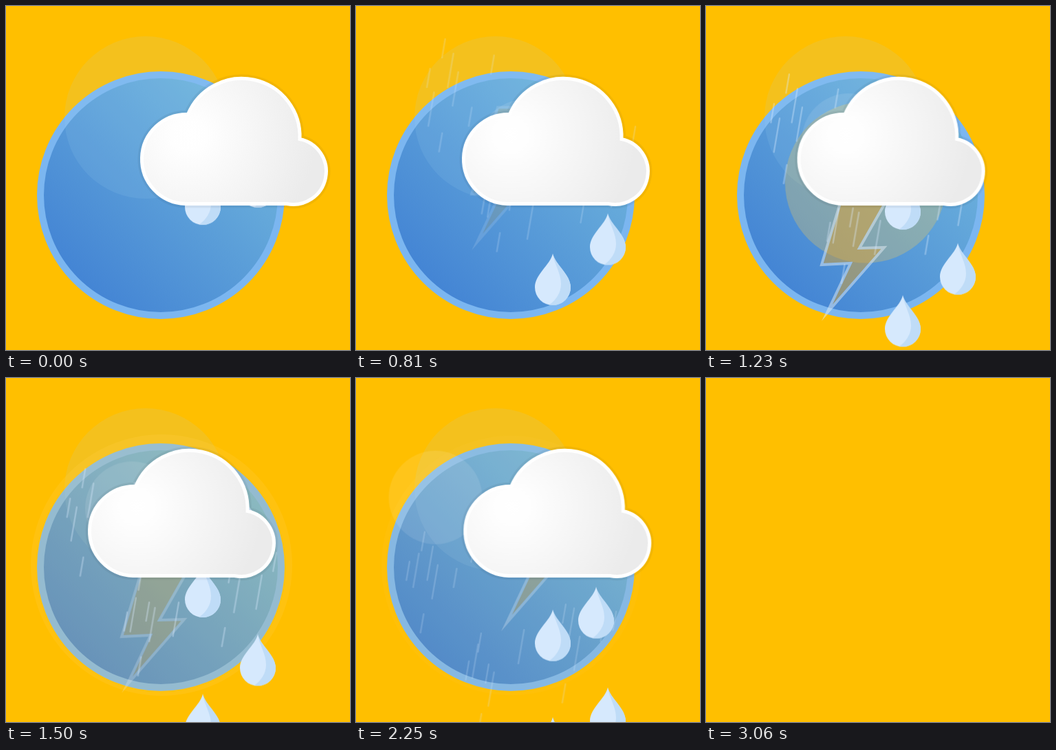
Write an HTML page that moves like this. It is 500 px wide and 500 px high and loops after 3090 ms.

```html
<!DOCTYPE html>
<html lang="en">
<head>
<meta charset="utf-8">
<title>Storm cloud</title>
<style>
  html, body { margin: 0; width: 100%; height: 100%; overflow: hidden; background: #ffbf00; }
  svg { display: block; width: 100vw; height: 100vh; }
  .anim, #rain line { animation: 3.09s linear infinite; }

  #scene { animation-name: blank; }
  #cloud { animation-name: drift; }
  #halo { animation-name: flash; }
  #flare { animation-name: slide; }
  #bolt { animation-name: strike; }
  #rain { animation-name: shower; }
  #rain line { animation-name: fall; }
  #dropA { animation-name: dropA; }
  #dropB { animation-name: dropB; }
  #dropC { animation-name: dropC; }
  #dropD { animation-name: dropD; }

  @keyframes blank {
    0%, 99% { opacity: 1; }
    99.02%, 100% { opacity: 0; }
  }
  @keyframes drift {
    0%, 98.06%, 100% { transform: translateX(0); }
    48.54% { transform: translateX(-76px); }
  }
  @keyframes flash {
    0%, 25.8% { transform: translate(242px, 231px) scale(0); opacity: .4; }
    48.54% { transform: translate(226px, 272px) scale(1); opacity: .2; }
    63.11% { transform: translate(226px, 272px) scale(1); opacity: .04; }
    84.47% { transform: translate(225px, 273px) scale(.985); opacity: .15; }
    100% { transform: translate(225px, 274px) scale(.97); opacity: .05; }
  }
  @keyframes slide {
    from { transform: translate(318px, 221px); }
    to { transform: translate(40px, 156px); }
  }
  @keyframes strike {
    0%, 19% { transform: translate(0, -158px); opacity: 0; }
    26.21% { transform: translate(0, -103px); opacity: .15; }
    39.6% { transform: translate(0, 0); opacity: .5; }
    48.54% { transform: translate(0, 0); opacity: .25; }
    63.11% { transform: translate(26px, -54px); opacity: 1; }
    77%, 100% { transform: translate(50px, -105px); opacity: 0; }
  }
  @keyframes shower {
    0%, 23.5% { opacity: 0; }
    28%, 68% { opacity: 1; }
    80%, 100% { opacity: 0; }
  }
  /* --v is the speed in px per ms; streaks are placed as they stand at 1950 ms */
  @keyframes fall {
    from { transform: translate(calc(var(--v) * 331.5px), calc(var(--v) * -1950px)); }
    to { transform: translate(calc(var(--v) * -193.8px), calc(var(--v) * 1140px)); }
  }
  @keyframes dropA {
    0% { transform: translate(286px, 243px); }
    56.15%, 100% { transform: translate(286px, 493px); }
  }
  @keyframes dropB {
    0%, 20.71% { transform: translate(286px, 200px); }
    100% { transform: translate(286px, 407.7px); }
  }
  @keyframes dropC {
    from { transform: translate(366px, 218px); }
    to { transform: translate(366px, 536px); }
  }
  @keyframes dropD {
    0%, 48.54% { transform: translate(349px, 177px); }
    100% { transform: translate(349px, 445px); }
  }
</style>
</head>
<body>
<svg viewBox="0 0 500 500">
  <defs>
    <linearGradient id="sky" gradientUnits="userSpaceOnUse" x1="100" y1="400" x2="350" y2="150">
      <stop offset="0" stop-color="#4384d4"/>
      <stop offset="1" stop-color="#6fb4dc"/>
    </linearGradient>
    <radialGradient id="puff" gradientUnits="userSpaceOnUse" cx="266" cy="187" r="185">
      <stop offset="0" stop-color="#fff"/>
      <stop offset=".14" stop-color="#fefefe"/>
      <stop offset="1" stop-color="#ebebeb"/>
    </radialGradient>
    <path id="cloudShape" d="M260.500 287.500A65 65 0 0 1 264.500 157.500A84.500 84.500 0 0 1 427 193.500A47.500 47.500 0 0 1 408 287.500Z"/>
    <g id="drop">
      <path fill="#d6e9fd" d="M0 0C4 17 26 30 26 49A26 26 0 0 1-26 49C-26 30-4 17 0 0Z"/>
      <path fill="#bfdcf7" d="M0 0C4 17 26 30 26 49A26 26 0 0 1-5 74.500C5 67 12 57 12 44C12 28 2 15 0 0Z"/>
    </g>
  </defs>
  <g id="scene" class="anim">
    <circle cx="225" cy="275" r="175" fill="url(#sky)" stroke="#7bb6f0" stroke-width="10"/>
    <circle cx="203" cy="162" r="118" fill="#a3d0e9" opacity=".12"/>
    <circle id="halo" class="anim" r="190" fill="#ffd050"/>
    <circle id="flare" class="anim" r="68" fill="#fff" fill-opacity=".1"/>
    <polygon id="bolt" class="anim" points="206,250 168,376 210,374 176,446 259,351 223,352 281,250"
      fill="#dfa22b" stroke="#e6eef5" stroke-width="4" stroke-miterlimit="10"/>
    <g id="rain" class="anim" stroke="#dcebff" stroke-opacity=".36" stroke-width="2.4" stroke-linecap="round"></g>
    <use id="dropA" class="anim" href="#drop"/>
    <use id="dropB" class="anim" href="#drop"/>
    <use id="dropC" class="anim" href="#drop"/>
    <use id="dropD" class="anim" href="#drop"/>
    <g id="cloud" class="anim">
      <use href="#cloudShape" fill="none" stroke="#000" stroke-opacity=".05" stroke-width="12"/>
      <use href="#cloudShape" fill="url(#puff)" stroke="#fff" stroke-width="5"/>
    </g>
  </g>
</svg>
<script>
  // x, y, speed of each streak
  const short = [
    [106, 187, .122], [84, 230, .122], [104, 310, .11], [188, 335, .12],
    [169, 383, .095], [188, 455, .11], [310, 412, .109], [384, 305, .114],
    [311, 293, .12], [199, 380, .12], [151, 250, .09], [178, 205, .117]
  ];
  const long = [
    [118, 208, .122], [125, 235, .122], [96, 228, .09], [182, 360, .09],
    [207, 390, .125], [247, 350, .053], [331, 342, .112], [367, 315, .063],
    [323, 300, .115]
  ];
  const rain = document.getElementById('rain');

  function addStreak([x, y, speed], length) {
    const line = document.createElementNS(rain.namespaceURI, 'line');
    const ends = { x1: x, y1: y, x2: x - length * .17, y2: y + length };
    for (const key in ends) line.setAttribute(key, ends[key]);
    line.style.setProperty('--v', speed);
    rain.append(line);
  }

  short.forEach(s => addStreak(s, 27));
  long.forEach(s => addStreak(s, 49));
</script>
</body>
</html>
```
